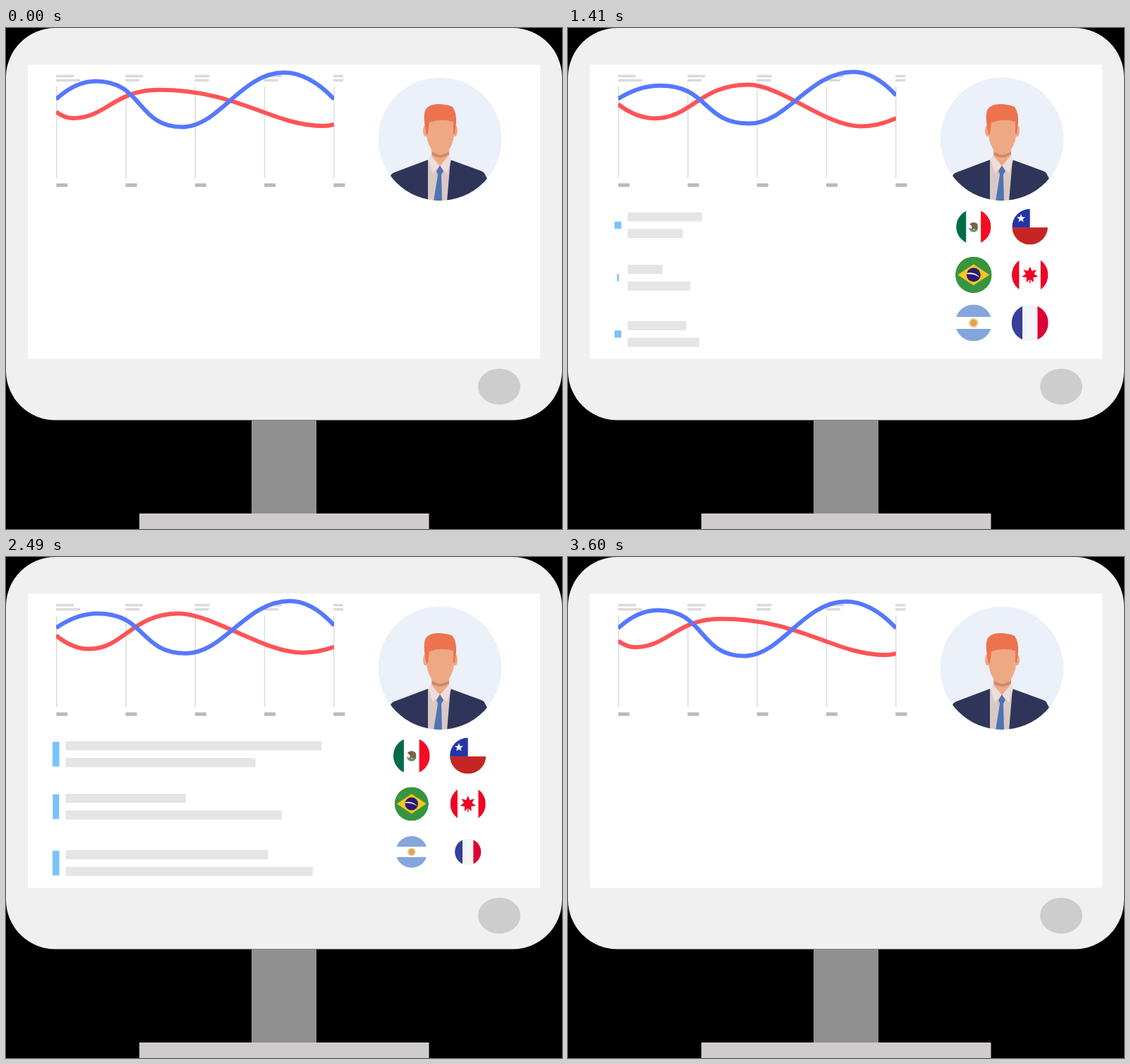
Recreate the animation shown at these times as an HTML page. Size 788x711 px, loop 3630 ms.

```html
<!DOCTYPE html>
<html lang="en">
<head>
<meta charset="utf-8">
<title>Dashboard on a monitor</title>
<style>
html, body { margin: 0; width: 100%; height: 100%; overflow: hidden; background: #000; }
svg { display: block; }
</style>
</head>
<body>
<svg width="788" height="711" viewBox="0 0 788 711">
  <defs>
    <clipPath id="disc"><circle r="26"/></clipPath>
    <clipPath id="portrait"><circle cx="615" cy="157.5" r="87.5"/></clipPath>
    <clipPath id="plot"><rect x="71" y="52" width="394" height="160"/></clipPath>
  </defs>

  <rect width="788" height="556.5" rx="70" fill="#f0f0f0"/>
  <rect x="31" y="52" width="726" height="417.5" fill="#fff"/>
  <ellipse cx="699" cy="509" rx="30" ry="25.5" fill="#cdcdcd"/>
  <rect x="348" y="556.5" width="92" height="133" fill="#909090"/>
  <rect x="189" y="689" width="410.5" height="22" fill="#cecccd"/>

  <g id="grid"></g>
  <g clip-path="url(#plot)" fill="none" stroke-width="6">
    <path id="red" stroke="#ff5456"/>
    <path id="blue" stroke="#5578ff"/>
  </g>
  <g id="bars"></g>

  <g clip-path="url(#portrait)">
    <circle cx="615" cy="157.5" r="87.5" fill="#ecf0f8"/>
    <path d="M597 188H632V246H597Z" fill="#d9c8c6"/>
    <path d="M545 210Q546 206 553 204L598 187V246H545Z M630 187L671 202Q678 204 679 208L682 214 670 246H625Z" fill="#2f3558"/>
    <path d="M603 165H628V184L615 197 603 186Z" fill="#efa884"/>
    <path d="M604 176Q615 182 628 176V179Q616 188 604 180Z" fill="#c88a70"/>
    <path d="M602 180L599 187 605 206 615 196Z M628 180L631 187 625 206 615 196Z" fill="#eedddb"/>
    <path d="M615 195L620 203 617 208 618 246H606L612 208 610 203Z" fill="#5073b1"/>
    <g fill="#efa884">
      <ellipse cx="594.5" cy="146" rx="3.5" ry="8"/>
      <ellipse cx="636.5" cy="146" rx="3.5" ry="8"/>
      <path d="M596 126H636L635 153Q633 168 625 176 615 184 606 176 598 168 596 153Z"/>
    </g>
    <path d="M596 152Q590 124 595 115 601 107 615 108 628 109 633 112 639 121 638 135L636 151 634 150V133Q617 128 600 134L598 150Z" fill="#ec734e"/>
  </g>

  <g id="flags"></g>
</svg>
<script>
const $ = id => document.getElementById(id);
const lerp = (a, b, k) => a + (b - a) * k;

function setAttrs(node, attrs) {
  for (const key in attrs) node.setAttribute(key, attrs[key]);
}
function add(parent, name, attrs = {}) {
  const node = document.createElementNS('http://www.w3.org/2000/svg', name);
  setAttrs(node, attrs);
  return parent.appendChild(node);
}
const rect = (parent, x, y, width, height, fill) => add(parent, 'rect', {x, y, width, height, fill});
const dot = (parent, r, fill) => add(parent, 'circle', {r, fill});
const path = (parent, d, fill) => add(parent, 'path', {d, fill});

// cubic-bezier(a, 0, 1 - a, 1)
function ease(x, a) {
  if (x <= 0) return 0;
  if (x >= 1) return 1;
  let lo = 0, hi = 1, y;
  for (let i = 0; i < 24; i++) {
    const s = (lo + hi) / 2;
    y = s * s * (3 - 2 * s);
    if (y + 3 * a * s * (1 - s) * (1 - 2 * s) < x) lo = s; else hi = s;
  }
  return y;
}

// Chart columns: two caption lines, a rule and a foot label
for (let i = 0; i < 5; i++) {
  const x = 71 + i * 98.25, caption = i === 4 ? 14 : 25 - 4 * (i === 2);
  rect($('grid'), x, 66.5, caption, 3.5, '#dadada');
  rect($('grid'), x, 72.5, i ? Math.min(caption, 20) : 34, 3.5, '#dadada');
  rect($('grid'), x, 83, 1.4, 130, '#dadada');
  rect($('grid'), x + .3, 220.5, 16, 5, '#b9b9b9');
}

// Text rows: top edge, then the full widths of both lines
const rows = [[261.5, 380, 282], [336, 178.5, 321], [416, 300.5, 367]].map(([y, ...widths], i) => ({
  y, widths, shrinksWide: i === 1,
  lines: widths.map((w, j) => rect($('bars'), 84.5, y + j * 23.7, 0, 13, '#e5e5e5')),
  marker: rect($('bars'), 66, y, 9.5, 0, '#77c3ff')
}));

// Evenly spaced poses: end heights, the three turning points, first handle of the last long bend
const curves = {
  red: {handles: [.38, .52, .31], poses: [
    {ends: [119, 136.8], turns: [95, 128, 217, 87.7, 450, 139], lead: .48},
    {ends: [114, 127.5], turns: [113, 132.5, 236, 80.3, 424, 132.5], lead: .26},
    {ends: [106.5, 128], turns: [126.5, 127, 261, 80.5, 412, 141.5], lead: .3}]},
  blue: {handles: [.55, .53, .42], poses: [
    {ends: [101, 101], turns: [127, 75.5, 250, 140.5, 394, 63.3], lead: .36},
    {ends: [100.5, 95], turns: [131, 82.5, 258, 135, 406, 62], lead: .36}]}
};

function bend(xa, ya, xb, yb, out, back) {
  return `C${lerp(xa, xb, out)} ${ya} ${lerp(xb, xa, back)} ${yb} ${xb} ${yb}`;
}
function curvePath({handles: [out, back, tail], poses}, p) {
  const pos = p * (poses.length - 1), i = Math.min(Math.floor(pos), poses.length - 2);
  const from = poses[i], to = poses[i + 1], k = pos - i;
  const mix = key => from[key].map((v, n) => lerp(v, to[key][n], k));
  const [y0, y4] = mix('ends'), [x1, y1, x2, y2, x3, y3] = mix('turns');
  const x0 = 71, x4 = 465;
  return `M${x0} ${y0}C${lerp(x0, x1, .3)} ${lerp(y0, y1, .6)} ${lerp(x0, x1, .65)} ${y1} ${x1} ${y1}`
    + bend(x1, y1, x2, y2, out, back)
    + bend(x2, y2, x3, y3, lerp(from.lead, to.lead, k), tail)
    + `C${lerp(x3, x4, .35)} ${y3} ${lerp(x3, x4, .7)} ${lerp(y3, y4, .4)} ${x4} ${y4}`;
}

// Flags, drawn around their own centres
function star(points, outer, inner, cx = 0, cy = 0) {
  const corners = Array.from({length: points * 2}, (_, i) => {
    const r = i % 2 ? inner : outer, angle = i * Math.PI / points;
    return [cx + r * Math.sin(angle), cy - r * Math.cos(angle)];
  });
  return 'M' + corners.join('L') + 'Z';
}
function sideBands(flag, edge, left, middle, right) {
  rect(flag, -26, -26, 26 - edge, 52, left);
  rect(flag, -edge, -26, 2 * edge, 52, middle);
  rect(flag, edge, -26, 26 - edge, 52, right);
}
const designs = [
  flag => sideBands(flag, 10.7, '#37409a', '#f3f4f5', '#dd0034'),
  flag => {
    rect(flag, -26, -26, 52, 17.5, '#85a6dc');
    rect(flag, -26, 8.5, 52, 17.5, '#85a6dc');
    dot(flag, 7, '#ecd3ac');
    dot(flag, 4.8, '#dfa548');
  },
  flag => {
    dot(flag, 26, '#38953f');
    path(flag, 'M-22.5 0L0-15 22.5 0 0 15Z', '#f8c51f');
    dot(flag, 10, '#2a1a70');
    path(flag, 'M-9.5-2.5Q2-5 9 4 2-2-9.5-1Z', '#fff');
  },
  flag => {
    sideBands(flag, 15.3, '#ee0423', '#fff', '#ee0423');
    path(flag, star(7, 12, 6.2), '#ee0423');
    rect(flag, -.7, 4, 1.4, 8, '#ee0423');
  },
  flag => {
    rect(flag, -26, -26, 26, 27, '#2335a9');
    rect(flag, -26, 1, 52, 25, '#c52625');
    path(flag, star(5, 6.6, 2.6, -13, -12), '#fff');
  },
  flag => {
    sideBands(flag, 10.9, '#006d48', '#fff', '#f60a24');
    path(flag, 'M-7 1Q0 7 7 1 6 8 0 8-6 8-7 1Z', '#5f9a68');
    path(flag, 'M-6-4Q-1-9 5-5 8-1 5 4L0 3-4 5-2 0Z', '#80603f');
  }
];
const flags = designs.map((paint, i) => {
  const node = add($('flags'), 'g', {'clip-path': 'url(#disc)'});
  paint(node);
  const onRight = [0, 3, 4].includes(i);
  return {node, x: onRight ? 654.7 : 574.8, y: 418.5 - 68.2 * (i >> 1)};
});

function draw(t) {
  const p = Math.sin(Math.PI * t / 3600) ** 2;
  for (const id in curves) $(id).setAttribute('d', curvePath(curves[id], p));

  const grow = ease(1 - Math.abs(t % 1800 - 900) / 900, .75);
  for (const {y, widths, shrinksWide, lines, marker} of rows) {
    lines.forEach((line, j) => line.setAttribute('width', widths[j] * grow));
    const width = 9.5 * (shrinksWide ? grow : 1), height = 36.7 * grow;
    setAttrs(marker, {x: 70.75 - width / 2, y: y + 18.35 - height / 2, width, height});
  }

  flags.forEach(({node, x, y}, i) => {
    const scale = ease((t - 88 * i) / 1350, .9) - ease((t - 1860 - 100 * i) / 1350, .9);
    setAttrs(node, {
      transform: `translate(${x} ${y}) scale(${scale})`,
      visibility: scale < .01 ? 'hidden' : 'visible'
    });
  });
}

function tick() {
  draw(Math.floor(performance.now() % 3630 / 30) * 30);
  requestAnimationFrame(tick);
}
tick();
</script>
</body>
</html>
```
